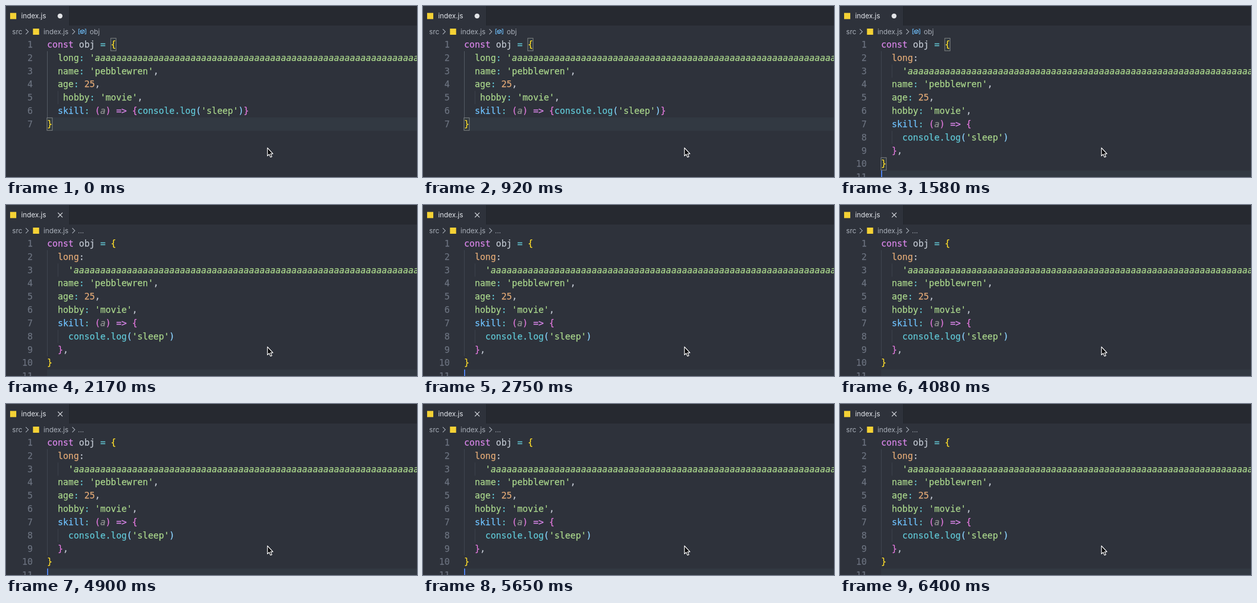
An HTML page that plays this animation: 800x333 px, repeating every 6.47 s.

```html
<!DOCTYPE html>
<html lang="en">
<head>
<meta charset="utf-8">
<title>Format on save</title>
<style>
  html, body { margin: 0; width: 100%; height: 100%; overflow: hidden; background: #2e323b; }
  svg { display: block; width: 800px; height: 333px; }
  text { white-space: pre; }
  .code { font: 17.18px "DejaVu Sans Mono", monospace; stroke-width: 0.25; }
  .slanted { font-style: oblique; }
  .ui { font: 13.5px Inter, sans-serif; }
</style>
</head>
<body>
<svg id="stage" viewBox="0 0 800 333" xmlns="http://www.w3.org/2000/svg"></svg>
<script>
const LOOP = 6470;
const FORMAT_AT = 1500;
const SAVE_AT = 1650;
const FIRST_BLINK = 250;
const BLINK = 500;

const LEFT = 80, TOP = 62.1, LINE = 25.83, CHAR = 10.343;

const COLORS = {
  keyword: '#d885e8', plain: '#c0c6d0', op: '#62c3d0', gold: '#ffdd2b',
  green: '#a9d58b', orange: '#e0a876', blue: '#6ec0fb', orchid: '#df78da',
  cyan: '#60c7d5', sky: '#8bd3ff', faded: '#8f9190', number: '#6b727f'
};
const UI = '#a9afb9';

// A leading "/" marks slanted text.
const long = ['green', "'", 'green', '/' + 'a'.repeat(70)];
const firstLine = ['keyword', 'const', 'plain', ' obj ', 'op', '= ', 'gold', '{'];
const nameLine = ['green', '  name', 'op', ': ', 'green', "'pebblewren'", 'plain', ','];
const ageLine = ['green', '  age', 'op', ': ', 'orange', '25', 'plain', ','];
const arrow = ['blue', '  skill', 'op', ': ', 'orchid', '(', 'faded', '/a', 'orchid', ') ', 'keyword', '=> ', 'orchid', '{'];
const call = ['cyan', 'console.log', 'sky', '(', 'green', "'sleep'", 'sky', ')'];
const hobby = indent => ['green', indent + 'hobby', 'op', ': ', 'green', "'movie'", 'plain', ','];

const rawLines = [
  firstLine,
  ['green', '  long', 'op', ': ', ...long],
  nameLine,
  ageLine,
  hobby('   '),
  [...arrow, ...call, 'orchid', '}'],
  ['gold', '}']
];
const formattedLines = [
  firstLine,
  ['orange', '  long', 'plain', ':'],
  ['plain', '    ', ...long],
  nameLine,
  ageLine,
  hobby('  '),
  arrow,
  ['plain', '    ', ...call],
  ['orchid', '  }', 'plain', ','],
  ['gold', '}'],
  []
];

const lineTop = row => TOP + (row - 1) * LINE;
const rect = (x, y, w, h, fill, extra = '') =>
  `<rect x="${x}" y="${y}" width="${w}" height="${h}" fill="${fill}" ${extra}/>`;
const label = (x, y, text, fill = UI) =>
  `<text class="ui" x="${x}" y="${y}" fill="${fill}">${text}</text>`;
const stroke = (d, color, width) =>
  `<path d="${d}" fill="none" stroke="${color}" stroke-width="${width}"/>`;
const group = (id, content) => `<g id="${id}">${content}</g>`;
const chevron = x => stroke(`M${x} 45l5 5l-5 5`, UI, 1.2);
const guide = (x, from, to, color) =>
  rect(x, lineTop(from), 1, (to - from + 1) * LINE, color);
const escape = text => text.replace('>', '&gt;');

function span(color, text) {
  const slanted = text.startsWith('/');
  return `<tspan class="${slanted ? 'slanted' : ''}" fill="${color}" stroke="${color}">` +
    `${escape(slanted ? text.slice(1) : text)}</tspan>`;
}

function codeLine(tokens, index) {
  const row = index + 1;
  const y = lineTop(row) + 18.87;
  let spans = '';
  for (let i = 0; i < tokens.length; i += 2)
    spans += span(COLORS[tokens[i]], tokens[i + 1]);
  return `<text class="code" x="52" y="${y}" text-anchor="end">${span(COLORS.number, String(row))}</text>` +
    `<text class="code" x="${LEFT}" y="${y}">${spans}</text>`;
}

const bracketBox = (column, row) =>
  rect(LEFT + column * CHAR - 0.2, lineTop(row) + 0.7, CHAR, LINE - 1.4, '#30383c',
    'stroke="#8a8d8f" stroke-width="1"');
const brackets = row => bracketBox(12, 1) + bracketBox(0, row);
const activeLine = row => rect(LEFT, lineTop(row), 720, LINE, '#323942');

const objectIcon =
  stroke('M144 45h-2.5v9.5h2.5M153 45h2.5v9.5h-2.5', '#6bb8f2', 1.2) +
  stroke('M144.5 48.5l4.5-2l3.5 1.5v3.5l-4.5 2l-3.5-1.5zl3.5 1.5l4.5-2M148 50v3.5', '#6bb8f2', 1.2);

document.getElementById('stage').innerHTML =
  rect(0, 0, 800, 333, '#2e323b') +
  rect(123, 0, 677, 38, '#262930') +
  rect(123, 0, 1, 38, '#20232a') +
  rect(8, 13.5, 12, 12, '#f5d235') +
  label(29.5, 24.4, 'index.js', '#e2e5ea') +
  label(12, 54.8, 'src') + chevron(38.5) +
  rect(52.5, 44, 12, 12, '#f5d235') +
  label(73, 54.8, 'index.js') + chevron(129) +
  group('unsaved', '<circle cx="105.2" cy="19.5" r="4.8" fill="#e1e3e6"/>' +
    objectIcon + label(163, 54.8, 'obj')) +
  group('saved', stroke('M101 15l9 9M110 15l-9 9', '#d8dbe0', 1.3) +
    label(140, 54.8, '...')) +
  group('raw', activeLine(7) + guide(80, 2, 6, '#596069') + guide(100.7, 5, 5, '#414650') +
    brackets(7) + rawLines.map(codeLine).join('')) +
  group('formatted', activeLine(11) + guide(80, 2, 9, '#434953') +
    guide(100.7, 3, 3, '#414650') + guide(100.7, 8, 8, '#414650') +
    group('matched', brackets(10)) + formattedLines.map(codeLine).join('')) +
  group('caret', rect(0, 0, 2, LINE, '#528bff')) +
  '<path d="M508.9 276.3v15.6l3.4-3.1l2.6 5.6l2.6-1.1l-2.5-5.5h4.6z" fill="#0b0b0d" ' +
  'stroke="#fff" stroke-width="1.3" stroke-linejoin="round"/>';

const byId = id => document.getElementById(id);
const show = (id, on) => byId(id).setAttribute('display', on ? 'inline' : 'none');

function caretVisible(t) {
  if (t < FIRST_BLINK) return false;
  const since = t - (t < FORMAT_AT ? FIRST_BLINK : FORMAT_AT);
  return Math.floor(since / BLINK) % 2 === 0;
}

function render(t) {
  const formatted = t >= FORMAT_AT;
  const saved = t >= SAVE_AT;
  show('raw', !formatted);
  show('formatted', formatted);
  show('matched', formatted && !saved);
  show('unsaved', !saved);
  show('saved', saved);
  const x = formatted ? LEFT : LEFT + CHAR;
  byId('caret').setAttribute('transform', `translate(${x} ${lineTop(formatted ? 11 : 7)})`);
  show('caret', caretVisible(t));
}

const start = performance.now();
function tick() {
  render((performance.now() - start) % LOOP);
  requestAnimationFrame(tick);
}
tick();
</script>
</body>
</html>
```
